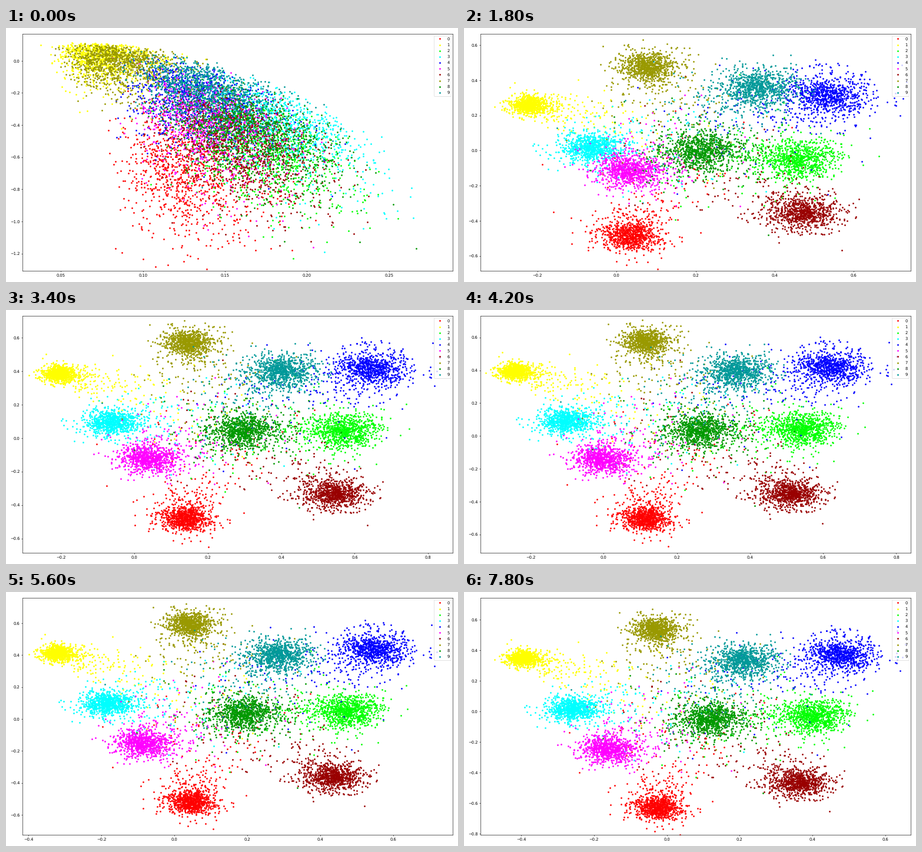
These frames come from a looping animation (768 px wide and 432 px high, 8 s). A matplotlib script:

```python
import numpy as np
import matplotlib.pyplot as plt
from matplotlib.animation import FuncAnimation

W, H = 768, 432
LEFT, TOP, RIGHT, BOTTOM = 28, 10, 759, 413
FRAMES, INTERVAL = 40, 200
SETTLED = 5  # epoch at which the clusters have formed
PER_DIGIT = 1000
K = 0.49  # scale of all default sizes

plt.rcParams.update({
    "font.family": "DejaVu Sans",
    "font.size": 10 * K,
    "text.hinting": "none",
    "axes.linewidth": 0.9 * K,
    "patch.linewidth": K,
    "lines.markersize": 6 * K,
    "lines.markeredgewidth": K,
})
for axis in ("xtick", "ytick"):
    plt.rcParams.update({
        f"{axis}.major.size": 3.5 * K,
        f"{axis}.major.pad": 3.5 * K,
        f"{axis}.major.width": 0.9 * K,
    })

# Per digit: colour, then centre at the start, when settled and at the end
# (stage pixels), and final cluster width
DIGITS = [
    ("#ff0000", (315, 247), (248, 350), (329, 368), 20),
    ("#ffff00", (168, 52), (132, 155), (100, 111), 13),
    ("#00ff00", (430, 205), (556, 245), (597, 212), 28),
    ("#00ffff", (465, 165), (256, 214), (182, 198), 21),
    ("#0000ff", (320, 122), (610, 128), (643, 105), 28),
    ("#ff00ff", (350, 170), (323, 227), (241, 268), 22),
    ("#990000", (400, 200), (595, 313), (570, 325), 24),
    ("#999900", (190, 62), (308, 73), (325, 62), 20),
    ("#009900", (425, 180), (400, 212), (420, 217), 28),
    ("#009999", (340, 105), (533, 91), (475, 115), 26),
]
colors, start, early, late, width = zip(*DIGITS)
start, early, late = (np.array(a, float) for a in (start, early, late))

# Axis limits x0, x1, y0, y1 at a few epochs
VIEW_KEYS = [0, 5, 9, 17, 25, 32, 39]
VIEWS = np.array([
    [.0265, .2889, -1.308, .168],
    [-.246, .740, -.560, .636],
    [-.344, .744, -.685, .664],
    [-.305, .867, -.686, .730],
    [-.369, .812, -.739, .733],
    [-.480, .696, -.708, .791],
    [-.512, .670, -.808, .744],
])

rng = np.random.default_rng(7)
label = np.repeat(np.arange(10), PER_DIGIT)
n = len(label)


def skewed(mean, scale):
    """Positive samples whose variance grows with the mean."""
    return rng.gamma(mean / scale, scale)


def top_edge(x):
    return 25 + 162 * (np.maximum(x - 130, 0) / 550) ** 2


def start_cloud():
    cx, cy = start[label].T
    x = 20 + skewed(cx - 20, 12)
    return np.column_stack([x, top_edge(x) + skewed(cy - top_edge(cx), 15)])


first = start_cloud()
pull = 0.9 * rng.random((n, 1)) ** 12  # a few points stray to other digits
other = rng.integers(0, 10, n)
size = np.array(width)[label, None] * [1, 0.5]
shape = size * rng.standard_normal((n, 2)) * rng.uniform(0.6, 1.4, (n, 1)) * (1 + 1.5 * pull)


def cloud(epoch):
    age = max(epoch - SETTLED, 0)
    fade = np.exp(-age / 6)
    sway = np.sin(np.pi * age / (FRAMES - 1 - SETTLED)) * np.array([-16, -11])
    centre = late + fade * (early - late) + sway
    goal = (centre.mean(axis=0) + centre[other]) / 2
    own = centre[label]
    return own + pull * (goal - own) + shape * (1 + 0.45 * fade)


def view(mix, epoch):
    if epoch < SETTLED:
        return VIEWS[0] + mix * (VIEWS[1] - VIEWS[0])
    return [np.interp(epoch, VIEW_KEYS, column) for column in VIEWS.T]


fig = plt.figure(figsize=(W / 100, H / 100), dpi=100, facecolor="white")
ax = fig.add_axes([LEFT / W, 1 - BOTTOM / H, (RIGHT - LEFT) / W, (BOTTOM - TOP) / H])
dots = [ax.plot([], [], ".", c=c, label=str(d))[0] for d, c in enumerate(colors)]
ax.legend(loc="upper right", borderaxespad=0.4)


def draw(epoch):
    mix = 1 - (1 - min(epoch / SETTLED, 1)) ** 2
    px, py = (first + mix * (cloud(epoch) - first)).T
    x0, x1, y0, y1 = view(mix, epoch)
    x = x0 + (px - LEFT) / (RIGHT - LEFT) * (x1 - x0)
    y = y1 - (py - TOP) / (BOTTOM - TOP) * (y1 - y0)
    for d, line in enumerate(dots):
        line.set_data(x[label == d], y[label == d])
    ax.set_xlim(x0, x1)
    ax.set_ylim(y0, y1)
    return dots


anim = FuncAnimation(fig, draw, frames=FRAMES, interval=INTERVAL,
                     repeat=True, repeat_delay=0, blit=False)
plt.show()
```
